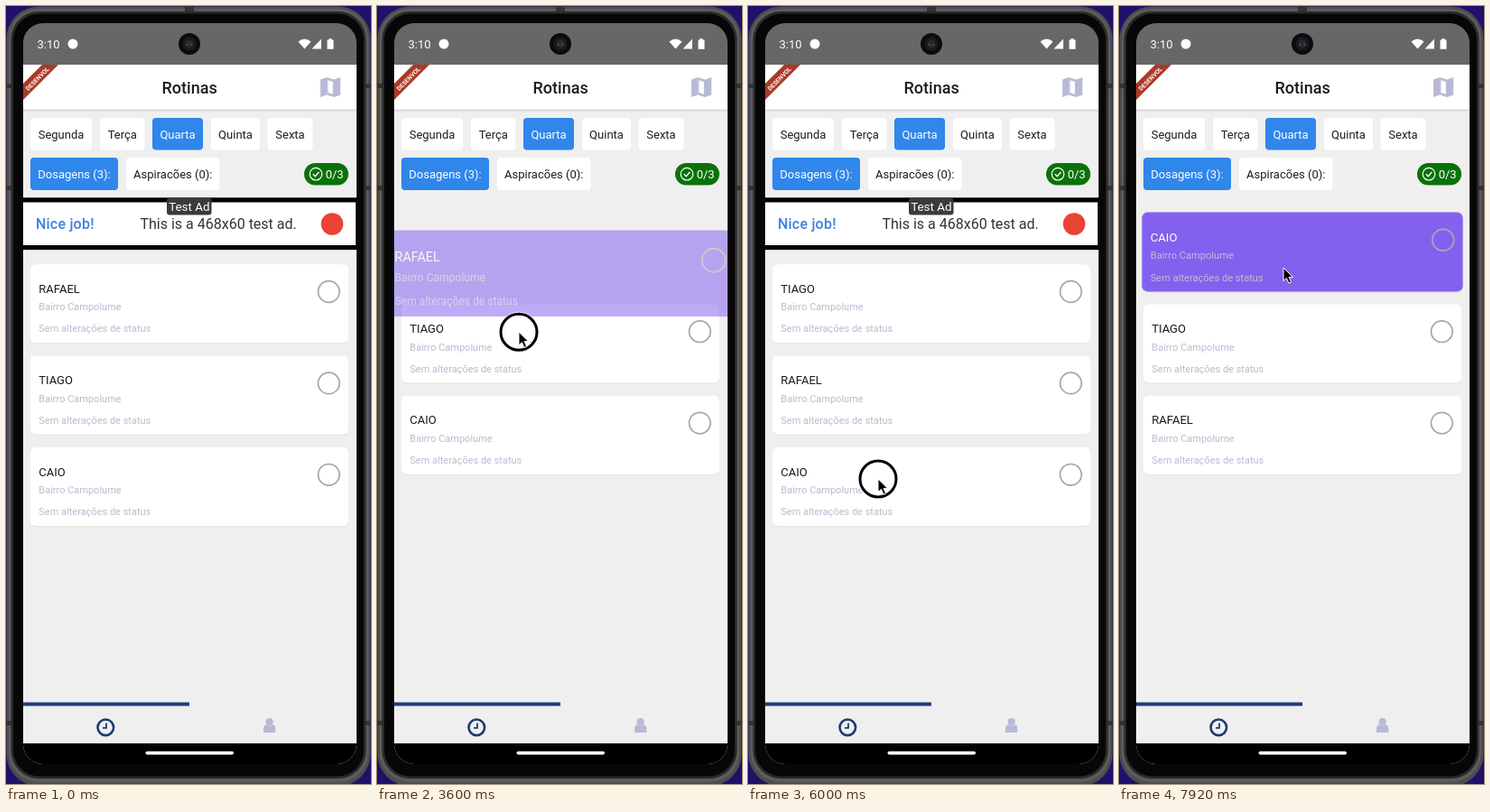
An HTML page that plays this animation: 404 by 862 pixels, repeating every 8 s.

```html
<!DOCTYPE html>
<html lang="pt">
<head>
<meta charset="utf-8">
<style>
html, body { margin: 0; width: 100%; height: 100%; overflow: hidden; background: #21106a; }
svg { display: block; width: 404px; height: 862px; }
text { font-family: Roboto, sans-serif; }
</style>
</head>
<body>
<svg id="stage" viewBox="0 0 404 862" xmlns="http://www.w3.org/2000/svg"></svg>
<script>
const LOOP = 8000;
const GAP = 101.4;
const NAMES = ['RAFAEL', 'TIAGO', 'CAIO'];

const rect = (x, y, w, h, fill, rx = 0, more = '') =>
  `<rect x="${x}" y="${y}" width="${w}" height="${h}" rx="${rx}" fill="${fill}" ${more}/>`;
const disc = (x, y, r, fill, more = '') =>
  `<circle cx="${x}" cy="${y}" r="${r}" fill="${fill}" ${more}/>`;
const label = (x, y, size, fill, str, more = '') =>
  `<text x="${x}" y="${y}" font-size="${size}" fill="${fill}" ${more}>${str}</text>`;
const path = (d, fill, more = '') => `<path d="${d}" fill="${fill}" ${more}/>`;
const mid = 'text-anchor="middle"';

function chip(x, y, w, h, str, on) {
  return rect(x, y, w, h, on ? '#2f86eb' : '#fff', 4) +
    label(x + w / 2, y + 22.8, 13, on ? '#fff' : '#1c1c1e', str, mid);
}

function body() {
  const marks = [[198, 0, 10, 7], [0, 86, 7, 5], [0, 199, 7, 5], [398, 86, 6, 5], [398, 199, 6, 5],
    [0, 792, 7, 5], [398, 792, 6, 5]];
  return rect(0, 0, 404, 862, '#21106a') +
    rect(.5, .5, 403, 864, '#4d4d4c', 36) +
    rect(3, 3, 398, 857, '#5c5c5a', 33) +
    marks.map(m => rect(...m, '#333332')).join('') +
    rect(5.5, 6, 393, 850, '#2a2a2a', 31) +
    rect(8, 8.5, 388, 845, '#070707', 29);
}

function statusBar() {
  return rect(19, 19, 369, 46, '#676767') +
    label(34.5, 46.6, 13, '#fff', '3:10') +
    disc(74, 42, 5.5, '#fff') +
    path('M323.5 39.5Q330.5 33.5 337.5 39.5L330.5 47.5Z', '#fff') +
    path('M338.5 47.5L349 36.5V47.5Z', '#fff') +
    path('M355.5 37.5h2v-1.5h3v1.5h2v10.2h-7z', '#fff') +
    disc(203, 42, 12, '#0c0c0e') +
    disc(203, 42, 7.5, '#1b1b1f') +
    disc(203, 42, 4, '#2a2a30') +
    disc(200.5, 43, 1, '#55555c') + disc(205.5, 43, 1, '#55555c');
}

function header() {
  return rect(19, 114, 369, 4, 'url(#fade)') +
    rect(19, 65, 369, 49.5, '#fff') +
    label(203.2, 97.2, 18, '#1c1c1e', 'Rotinas', mid + ' font-weight="500"') +
    path('M348 81.5L355.2 79V98.5L348 101Z M363 81.5L370.2 79V98.5L363 101Z', '#b8bad5') +
    path('M355.2 79L363 81.5V101L355.2 98.5Z', '#b8bad5') +
    path('M356.4 82.2L361.8 84V97.8L356.4 96Z', '#fff') +
    path('M19 86L40 65H58L19 104Z', '#ab3a26') +
    label(0, 2.4, 6.8, '#fff', 'DESENVOL', mid + ' font-weight="700" transform="translate(34.8 80.6) rotate(-45)"');
}

function filters() {
  return chip(27, 124, 68, 35.5, 'Segunda') + chip(104, 124, 49.5, 35.5, 'Terça') +
    chip(162, 124, 56, 35.5, 'Quarta', true) + chip(227, 124, 54, 35.5, 'Quinta') +
    chip(289.5, 124, 50, 35.5, 'Sexta') +
    chip(27, 168, 97, 36, 'Dosagens (3):', true) + chip(133, 168, 103.5, 36, 'Aspiracões (0):') +
    rect(330, 174, 49, 24.5, '#0a720a', 12.2) +
    disc(343, 186.2, 6.8, 'none', 'stroke="#fff" stroke-width="1.2"') +
    path('M339.8 186.3l2.4 2.5l4.2-4.8', 'none', 'stroke="#fff" stroke-width="1.3"') +
    label(363.7, 191, 13, '#fff', '0/3', mid);
}

function ad() {
  return '<g id="ad">' + rect(19, 212.3, 369, 57.8, '#000') + rect(19, 217.5, 368, 47.5, '#fff') +
    label(33, 247, 16, '#3b80df', 'Nice job!', 'font-weight="500" letter-spacing=".2"') +
    label(148.5, 247, 16, '#333', 'This is a 468x60 test ad.') +
    disc(361, 241.5, 12.3, '#ea4335') +
    rect(178, 212.8, 49.5, 18.7, '#3b3b3b', 3) +
    label(202.8, 227.2, 13.4, '#fff', 'Test Ad', mid) + '</g>';
}

function card(name, i) {
  return `<g id="card${i}">` +
    rect(27, 1, 352, 87.5, '#000', 6, 'opacity=".035" class="shade"') +
    rect(27, 0, 352, 87, '#fff', 6, 'class="back"') +
    label(36.3, 31.7, 13, '#1c1c1e', name, 'class="name"') +
    label(36.3, 51.3, 11, '#bbbbd0', 'Bairro Campolume') +
    label(36.3, 75.3, 11, '#bbbbd0', 'Sem alterações de status') +
    disc(357.3, 30.3, 11.8, 'none', 'stroke="#a6a6a6" stroke-width="1.7"') + '</g>';
}

function tabs() {
  return rect(19, 771.5, 184, 4, '#1f3c7c') +
    disc(110.3, 799.3, 8.8, 'none', 'stroke="#1f3a73" stroke-width="2.6"') +
    path('M111 794.5v5.3h-4', 'none', 'stroke="#1f3a73" stroke-width="1.8"') +
    disc(291.6, 793, 4.1, '#b7b9d6') +
    path('M285 805V800.5Q285 796.5 288.5 796.3Q291.6 798.5 294.7 796.3Q298.3 796.5 298.3 800.5V805Z', '#b7b9d6') +
    rect(19, 817, 369, 23, '#000') + rect(154.5, 825.7, 97.5, 3.8, '#fff', 1.9);
}

const stage = document.getElementById('stage');
stage.innerHTML =
  `<defs><linearGradient id="fade" x2="0" y2="1"><stop stop-color="#cfcfcf"/><stop offset="1" stop-color="#efefef"/></linearGradient>
   <clipPath id="screen">${rect(19, 19, 369, 821, '#000', 22)}</clipPath></defs>` +
  body() +
  `<g clip-path="url(#screen)">${rect(19, 60, 369, 780, '#efefef')}
   ${statusBar()}${header()}${filters()}${ad()}
   <g id="list">${NAMES.map(card).join('')}</g>${tabs()}</g>
   <g id="pointer"><g id="ring">
   ${disc(0, 0, 20, 'none', 'stroke="#fff" stroke-width="5" opacity=".7"')}
   ${disc(0, 0, 20, 'none', 'stroke="#000" stroke-width="3"')}</g>
   ${path('M0 0V14.5L3.4 11.4L6 17.2L8.6 16L6.1 10.4H10.6Z', '#000', 'stroke="#fff" stroke-width="1"')}</g>`;

const $ = id => document.getElementById(id);
const list = $('list');
const cards = NAMES.map((_, i) => $('card' + i));

// Pointer path: time, x, y
const TRACK = [
  [240, 400, 470], [1200, 157, 324], [2640, 157, 324], [3360, 157, 337], [3600, 157, 361],
  [3920, 156, 439], [4240, 156, 442], [5120, 151, 470], [5560, 144, 524], [6680, 144, 524],
  [6760, 147, 508], [7120, 180, 331], [7200, 183, 298], [7600, 183, 298], [7920, 182, 290]
];

// Each drag: card, start, drop, list reset, grip distance from card top to pointer
const DRAGS = [
  { id: 0, on: 2560, drop: 4000, end: 4480, grip: 108.5 },
  { id: 2, on: 6160, drop: 7600, end: 8100, grip: 92 }
];

function pointerAt(t) {
  let i = 1;
  while (i < TRACK.length - 1 && TRACK[i][0] < t) i++;
  const [a, b] = [TRACK[i - 1], TRACK[i]];
  const p = Math.min(1, Math.max(0, (t - a[0]) / (b[0] - a[0])));
  return [a[1] + (b[1] - a[1]) * p, a[2] + (b[2] - a[2]) * p];
}

// Critically damped step from 0 to 1
function spring(t, start, w = .0225) {
  const x = Math.max(0, t - start) * w;
  return 1 - (1 + x) * Math.exp(-x);
}

function draw(t) {
  const [px, py] = pointerAt(t);
  const drag = DRAGS.find(d => t >= d.on && t < d.end);
  const base = drag ? 229 : 286.2;
  const slots = [
    (t < 4000 ? 0 : 1) + spring(t, 6845),
    1 - spring(t, 3740) + spring(t, 7052),
    t < 7600 ? 2 : 0
  ];

  cards.forEach((el, i) => {
    const active = drag && drag.id === i;
    let y = base + GAP * slots[i];
    let lift = 0;
    if (active) {
      if (t < drag.drop) y = Math.min(base + 2 * GAP, Math.max(base, py - drag.grip));
      lift = spring(t, drag.on + 120) - spring(t, drag.drop, .0125);
    }
    el.setAttribute('transform', `translate(203 ${y + 43.5}) scale(${1 + .1 * lift}) translate(-203 -43.5)`);
    el.setAttribute('opacity', 1 - .5 * lift);
    el.querySelector('.back').setAttribute('fill', active ? '#7f5af0' : '#fff');
    el.querySelector('.name').setAttribute('fill', active ? '#fff' : '#1c1c1e');
  });
  const top = cards[drag ? drag.id : 2];
  if (list.lastChild !== top) list.appendChild(top);

  const show = (id, on) => $(id).setAttribute('visibility', on ? 'inherit' : 'hidden');
  show('ad', t < 2560 || (t >= 5360 && t < 6160));
  show('pointer', t >= 240);
  show('ring', (t >= 2160 && t < 4000) || (t >= 5600 && t < 7600));
  $('pointer').setAttribute('transform', `translate(${px} ${py})`);
}

const begin = performance.now();
function tick() {
  draw((performance.now() - begin) % LOOP);
  requestAnimationFrame(tick);
}
tick();
</script>
</body>
</html>
```
